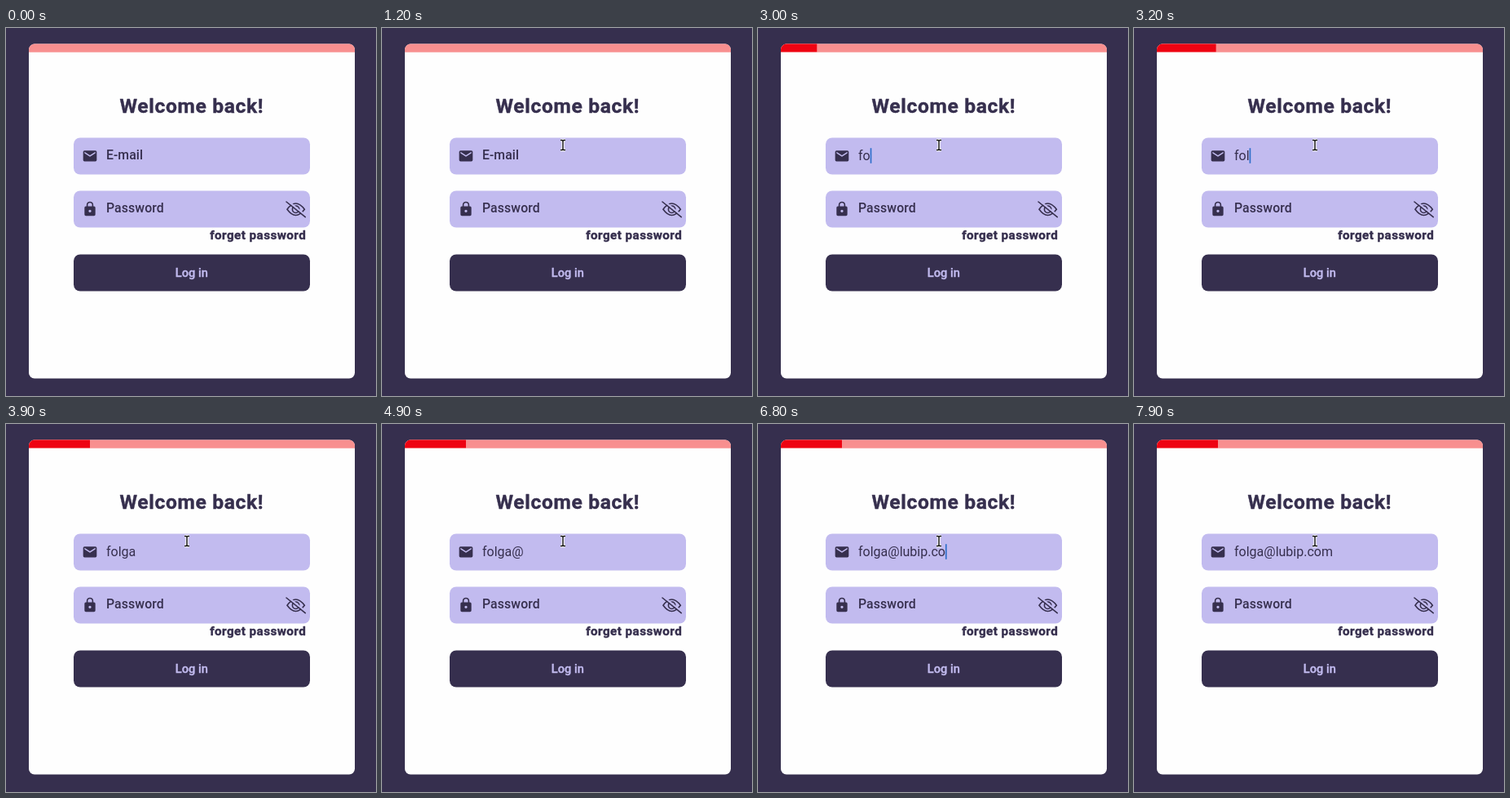
Write an HTML page that moves like this. It is 454 px wide and 451 px high and loops after 8 s.

```html
<!DOCTYPE html>
<html lang="en">
<head>
<meta charset="utf-8">
<title>Login form</title>
<style>
  html, body { margin: 0; width: 100%; height: 100%; overflow: hidden; background: #362f4e; }
  svg { display: block; width: 100%; height: 100%; }
  text { font-family: Roboto, Inter, sans-serif; font-size: 16px; fill: #362f4e; white-space: pre; }
  .label { font-weight: 500; font-size: 15.8px; letter-spacing: .1px; }
  .bold { font-weight: 700; stroke: #362f4e; stroke-width: .4; stroke-linejoin: round; }
  .title { font-size: 24.6px; letter-spacing: .65px; }
  .link { font-size: 15.2px; letter-spacing: .45px; }
  .button { font-weight: 500; font-size: 14.6px; fill: #c2bbef; stroke: #c2bbef; stroke-width: .35; }
  .field { fill: #c2bbef; }
  .dark { fill: #362f4e; }
  .line { fill: none; stroke: #362f4e; stroke-width: 1.6; stroke-linecap: round; }
  .caret { fill: #2f6fcb; }
</style>
</head>
<body>
<svg viewBox="0 0 454 451">
  <defs>
    <clipPath id="card"><rect x="28" y="19.6" width="400" height="410" rx="7"/></clipPath>
    <path id="beamShape" d="M-3 -6H-1L0 -5L1 -6H3M0 -5V5M-3 6H-1L0 5L1 6H3"/>
  </defs>
  <rect class="dark" width="454" height="451"/>
  <g clip-path="url(#card)">
    <rect x="28" y="19" width="400" height="411" fill="#fefefe"/>
    <rect x="28" y="19" width="400" height="10.7" fill="#f88f8f"/>
    <rect id="bar" x="28" y="19" width="0" height="10.3" fill="#ee0312"/>
  </g>

  <text class="bold title" x="227.8" y="103.5" text-anchor="middle">Welcome back!</text>

  <rect class="field" x="83" y="134.5" width="290" height="45" rx="8"/>
  <path class="dark" transform="translate(93 146.8) scale(.833)"
    d="M20 4H4a2 2 0 0 0-2 2v12a2 2 0 0 0 2 2h16a2 2 0 0 0 2-2V6a2 2 0 0 0-2-2zm0 4l-8 5-8-5V6l8 5 8-5z"/>
  <text id="hint" class="label" x="123" y="161.2">E-mail</text>
  <text id="mail" x="123" y="162"></text>
  <rect id="mailCaret" class="caret" width="1.7"/>

  <rect class="field" x="83" y="199.5" width="290" height="45" rx="8"/>
  <path class="dark" fill-rule="evenodd" transform="translate(93 211.8) scale(.833)"
    d="M18 8h-1V6A5 5 0 0 0 7 6v2H6a2 2 0 0 0-2 2v10a2 2 0 0 0 2 2h12a2 2 0 0 0 2-2V10a2 2 0 0 0-2-2zM12 17a2 2 0 1 1 0-4 2 2 0 0 1 0 4zM8.9 8V6a3.1 3.1 0 0 1 6.2 0v2z"/>
  <text class="label" x="123" y="226.2">Password</text>
  <rect id="passCaret" class="caret" x="123" y="214.3" width="1.7" height="14.4"/>
  <g class="line">
    <path d="M345 222.3Q355.5 207.8 366.3 222.3Q355.5 236.8 345 222.3Z"/>
    <circle cx="355.6" cy="222.3" r="4.2"/>
    <path d="M346 212.2L369 230.8" stroke="#c2bbef" stroke-width="2.2"/>
    <path d="M344 213L367.2 231.7"/>
  </g>

  <text class="bold link" x="368.2" y="259" text-anchor="end">forget password</text>
  <rect class="dark" x="83" y="277.5" width="290" height="45" rx="8"/>
  <text class="button" x="227.8" y="305" text-anchor="middle">Log in</text>

  <g id="beam" fill="none">
    <use href="#beamShape" stroke="#fff" stroke-width="3.4"/>
    <use href="#beamShape" stroke="#111" stroke-width="1.4"/>
  </g>
  <path id="arrow" d="M0 0V15.5L3.6 12.2L6 18L8.6 16.9L6.2 11.2H11Z" fill="#111" stroke="#fff"/>
</svg>
<script>
  const LOOP = 8000, KEY_GAP = 120, BLINK = 500;
  const ENTER = 900, FOCUS = 1700, TAB = 7400;
  const bursts = { 2880: "folga", 4400: "@", 4980: "lu", 5280: "bi", 6000: "p", 6300: ".", 6660: "com" };

  // One entry per keystroke, evenly spaced inside each burst.
  const keys = Object.entries(bursts).flatMap(([start, part]) =>
    [...part].map((char, i) => ({ char, time: +start + i * KEY_GAP })));

  const $ = id => document.getElementById(id);
  const mail = $("mail"), caret = $("mailCaret");
  const show = (el, on) => el.setAttribute("visibility", on ? "visible" : "hidden");
  const set = (el, attrs) => Object.entries(attrs).forEach(([k, v]) => el.setAttribute(k, v));
  const easeOut = (t, start, length) => 1 - (1 - Math.min(1, Math.max(0, (t - start) / length))) ** 3;
  const mix = (a, b, p) => a + (b - a) * p;
  const lit = (t, since) => t >= since && Math.floor((t - since) / BLINK) % 2 === 0;

  function drawMail(t) {
    const typed = keys.filter(key => key.time <= t);
    const text = typed.map(key => key.char).join("");
    if (mail.textContent !== text) mail.textContent = text;
    show($("hint"), !text);
    set(caret, {
      x: 123 + (text ? mail.getComputedTextLength() : 0),
      y: text ? 147.2 : 149.4,
      height: text ? 18.6 : 14.8
    });
    show(caret, t < TAB && lit(t, text ? typed.at(-1).time : FOCUS));
    set($("bar"), { width: 75 * easeOut(t, keys[0].time, 470) });
  }

  function drawPointer(t) {
    const p = easeOut(t, ENTER, 300);
    const x = mix(343, 222, p), y = mix(182, 143.5, p);
    const overField = y < 179.5;
    show($("arrow"), t >= ENTER && !overField);
    show($("beam"), overField);
    set($(overField ? "beam" : "arrow"), { transform: `translate(${x} ${y})` });
  }

  function draw() {
    const t = performance.now() % LOOP;
    drawMail(t);
    drawPointer(t);
    show($("passCaret"), lit(t, TAB));
    requestAnimationFrame(draw);
  }
  draw();
</script>
</body>
</html>
```
